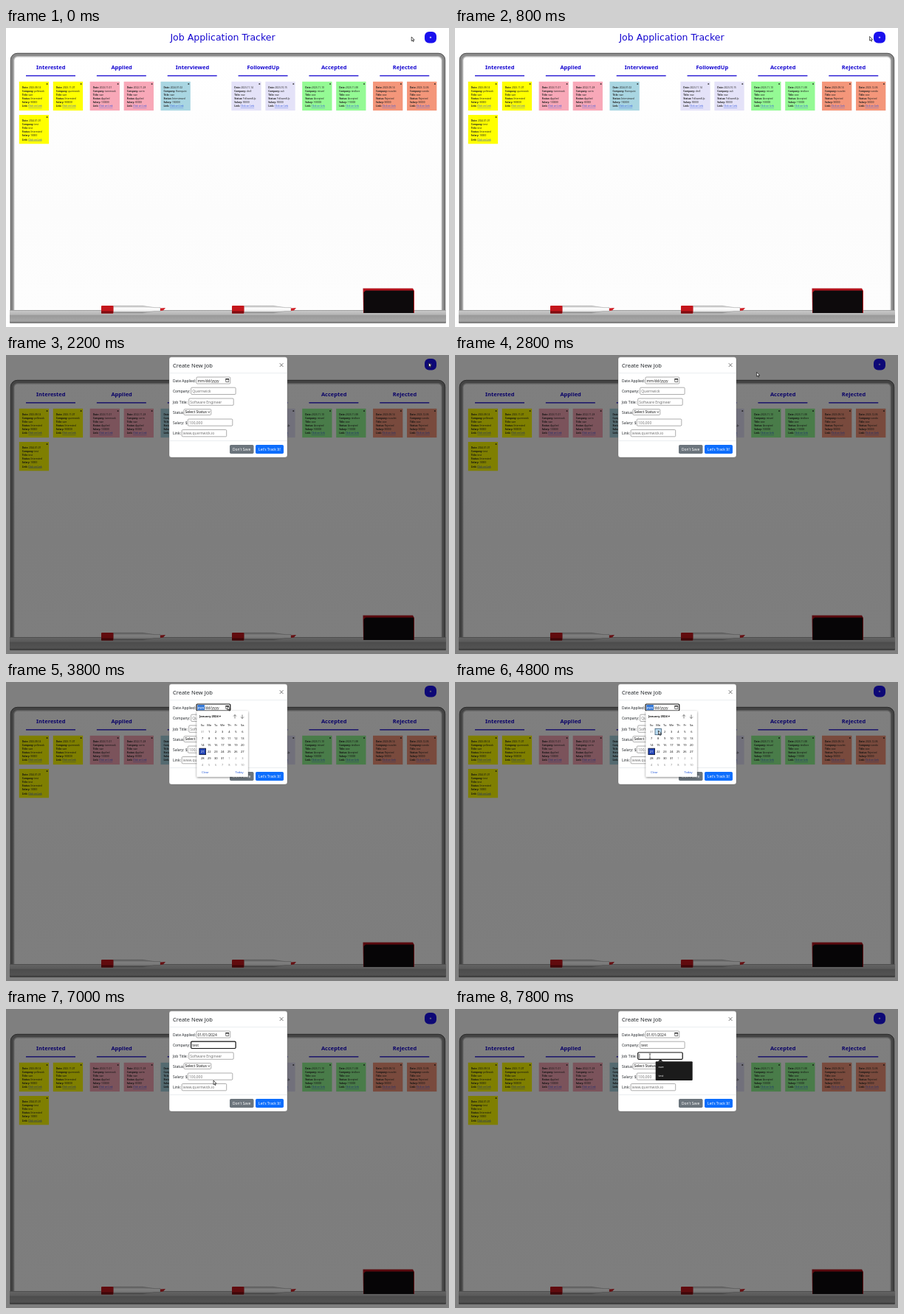
Recreate the animation shown at these times as an HTML page. Size 600x406 px, loop 8 s.

```html
<!DOCTYPE html>
<html lang="en">
<head>
<meta charset="utf-8">
<title>Job Application Tracker</title>
<style>
html, body { margin: 0; width: 100%; height: 100%; overflow: hidden; background: #fff; }
svg { display: block; width: 600px; height: 406px; font-family: "Noto Sans", "Open Sans", sans-serif; }
.hand { font-family: "DejaVu Sans", sans-serif; }
.mid { text-anchor: middle; }
</style>
</head>
<body>
<svg viewBox="0 0 600 406">
  <defs>
    <linearGradient id="surface" x2="0" y2="1">
      <stop stop-color="#fff"/><stop offset=".6" stop-color="#fcfcfc"/><stop offset="1" stop-color="#fdfdfd"/>
    </linearGradient>
    <linearGradient id="tray" x2="0" y2="1">
      <stop stop-color="#8c8c8c"/><stop offset=".08" stop-color="#c6c6c6"/><stop offset=".35" stop-color="#b4b4b4"/>
      <stop offset=".4" stop-color="#999"/><stop offset=".8" stop-color="#a6a6a6"/><stop offset="1" stop-color="#707070"/>
    </linearGradient>
    <linearGradient id="barrel" x2="0" y2="1">
      <stop stop-color="#bbb"/><stop offset=".35" stop-color="#fff"/><stop offset=".7" stop-color="#eee"/><stop offset="1" stop-color="#777"/>
    </linearGradient>
    <filter id="shadow" x="-20%" y="-20%" width="140%" height="140%">
      <feDropShadow dx="0" dy="1" stdDeviation="1.5" flood-opacity=".5"/>
    </filter>
  </defs>
  <g id="board"></g>
  <g id="button"></g>
  <g id="modal"></g>
  <g id="cursor"></g>
</svg>
<script>
const BLUE = "#1406d0";
const LOOP = 8000, STEP = 200;
const layer = id => document.getElementById(id);

const rect = (x, y, w, h, fill, more = "") =>
  `<rect x="${x}" y="${y}" width="${w}" height="${h}" fill="${fill}" ${more}/>`;
const path = (d, fill, more = "") => `<path d="${d}" fill="${fill}" ${more}/>`;
const line = (d, color, width) => path(d, "none", `stroke="${color}" stroke-width="${width}"`);
const text = (x, y, size, s, fill = "#212529", more = "") =>
  `<text x="${x}" y="${y}" font-size="${size}" fill="${fill}" ${more}>${s}</text>`;

// Columns: heading, note colour, then notes as date, company, title, salary
const columns = [
  ["Interested", "#ffff00", ["2023-08-14", "pellowick", "swe", 90000],
    ["2023-11-07", "quernwick", "swe", 900000], ["2024-01-01", "test", "test", 10000]],
  ["Applied", "#f8a8b8", ["2023-11-01", "tarnmook", "swe", 100000], ["2022-11-28", "ovrin", "swe", 80000]],
  ["Interviewed", "#a9d6e2", ["2024-01-02", "Harnquist", "swe", 150000]],
  ["FollowedUp", "#e4e2f8", ["2023-11-14", "drell", "swe", 90000], ["2023-10-15", "zuli", "swe", 90000]],
  ["Accepted", "#94fa94", ["2023-11-10", "mivvel", "swe", 100000], ["2023-11-08", "tindlore", "swe", 110000]],
  ["Rejected", "#f4967a", ["2023-08-14", "nuvolet", "swe", 90000], ["2023-12-06", "vondo", "swe", 90000]],
];

function note(x, y, color, status, [date, company, title, salary]) {
  const rows = { Date: date, Company: company, Title: title, Status: status, Salary: salary };
  const lines = Object.entries(rows).map(([key, value], i) =>
    text(x + 4, y + 8.8 + i * 5.1, 3.15, `<tspan font-weight="700">${key}:</tspan> ${value}`, "#222"));
  return rect(x, y, 40.3, 39.3, color) + lines.join("") +
    text(x + 4, y + 34.5, 3.15, '<tspan font-weight="700">Link:</tspan> ' +
      '<tspan fill="#2a50e0" text-decoration="underline">Click on Link</tspan>', "#222") +
    text(x + 36.8, y + 4.3, 3.8, "x", "#111", 'font-weight="700"');
}

const marker = x => `<g transform="translate(${x} 377)">` +
  path("M16 .3H56L72 2.6H80V7.6H72L56 10H16Z", "url(#barrel)", 'stroke="#888" stroke-width=".4"') +
  rect(0, 0, 16.5, 10.5, "#c4161c", 'rx="1"') + rect(0, 7.5, 16, 3, "#7d0c10") +
  path("M80 3.5 87 3 84 6.6 80 7Z", "#cf2228") + "</g>";

function drawBoard() {
  let out = rect(0, 0, 600, 406, "#fff") +
    text(293.5, 17, 12.5, "Job Application Tracker", BLUE, 'class="hand mid"') +
    rect(8.5, 36.5, 584, 356, "url(#surface)", 'rx="7" stroke="#8a8a8a" stroke-width="5"') +
    rect(6.3, 34.3, 588.4, 360, "none", 'rx="9" stroke="#555" stroke-width="1"') +
    rect(10.7, 38.7, 579.6, 350, "none", 'rx="5" stroke="#bcbcbc" stroke-width="1.4"') +
    rect(5, 383, 591, 18, "url(#tray)", 'rx="1"');
  columns.forEach(([status, color, ...notes], i) => {
    const x = 17.8 + i * 95.85;
    out += text(x + 43, 55.8, 7.5, status, BLUE, 'class="mid" font-weight="700"') +
      rect(x + 9.2, 64.2, 67, 1.3, BLUE);
    notes.forEach((n, k) => out += note(x + (k % 2) * 46, 72.8 + (k >> 1) * 45.2, color, status, n));
  });
  out += marker(129) + marker(306) +
    path("M483.5 353.5H551L553 357V387H484Z", "#b3121c") +
    path("M487 356.5H552V387H484.5V359Z", "#0d0a0c");
  layer("board").innerHTML = out;
}

const field = (x, y, w, h, on) =>
  rect(x, y, w, h, "#fff", `rx="1.2" stroke="${on ? "#111" : "#767676"}" stroke-width="${on ? 1.2 : .6}"`);

function calendar(t) {
  let out = rect(258.5, 39.3, 69.3, 89.5, "#fff", 'rx="1" filter="url(#shadow)"') +
    text(262, 48, 4, "January 2024 ▾", "#111", 'font-weight="700"') +
    line("M310 49.5V44.5M308 46.5 310 44.5 312 46.5M320 44.5V49.5M318 47.5 320 49.5 322 47.5", "#333", .6);
  const cell = (col, row, s, fill) =>
    text(266.2 + col * 9.02, 59.8 + row * 9.1, 4, s, fill, 'class="mid"');
  ["Su", "Mo", "Tu", "We", "Th", "Fr", "Sa"].forEach((d, i) => out += cell(i, 0, d, "#111"));
  out += rect(261.9, 90.2, 8.6, 8.4, "#2446b8", 'stroke="#101838" stroke-width=".9"');
  if (t >= 4600) out += rect(271, 63.3, 8.5, 8.4, "#b9dcf2", 'stroke="#2b4a66" stroke-width=".7"');
  for (let i = 0; i < 42; i++) {
    const day = (i + 30) % 31 + 1;
    const fill = i === 21 ? "#fff" : i < 1 || i > 31 ? "#888" : "#111";
    out += cell(i % 7, 1 + Math.floor(i / 7), day, fill);
  }
  return out + text(265, 123.8, 4, "Clear", "#2458d8") + text(310.5, 123.8, 4, "Today", "#2458d8");
}

function suggest(x, y, items, active) {
  let out = rect(x, y, 50, items.length * 11.6 + 2.6, "#1b1b1b", 'rx="1"') +
    path(`M${x + 3} ${y}l3.5 -3 3.5 3Z`, "#1b1b1b");
  items.forEach((s, i) => {
    if (i === active) out += rect(x, y + 1.3 + i * 11.6, 50, 11.6, "#454545");
    out += text(x + 3.8, y + 9 + i * 11.6, 4, s, "#eee");
  });
  return out;
}

function modal(t) {
  if (t < 2200) return "";
  const picking = t >= 3400 && t < 5600;
  const inCompany = t >= 6000 && t < 7400, inTitle = t >= 7400;
  const hint = "#757575", ink = "#222";
  let out = rect(0, 0, 600, 406, "#000", 'opacity=".5"') +
    rect(221, 2.8, 160, 136.2, "#fff", 'rx="3" stroke="#555" stroke-width=".3"') +
    text(226, 16.8, 7.5, "Create New Job", "#212529", 'font-weight="500"') +
    line("M370.7 11.2 375.5 16M375.5 11.2 370.7 16", "#666", .9) +
    line("M221 24.5H381M221 116.5H381", "#dee2e6", .6);

  const labels = [["Date Applied:", 36.6], ["Company:", 51.2], ["Job Title:", 65.8],
    ["Status:", 79.6], ["Salary: $", 93.5], ["Link:", 108.2]];
  for (const [s, y] of labels) out += text(226, y, 4.95, s);

  out += field(258, 30, 45.8, 9, picking) + field(250.6, 44.2, 60.5, 9.3, inCompany) +
    field(247.7, 59, 60.5, 9.3, inTitle) + field(241, 73.6, 36.8, 7.8) +
    field(246.3, 87, 60.5, 9.2) + field(238.2, 101.5, 60.5, 9.3);

  if (picking) out += rect(259.3, 31, 9.6, 7.2, "#3478d8");
  out += t < 5600
    ? text(259.5, 36.6, 4.95, `<tspan fill="${picking ? "#fff" : ink}">mm</tspan>/dd/yyyy`, ink)
    : text(259.5, 36.6, 4.95, "01/01/2024", ink);
  out += rect(297.8, 32.5, 4, 4, "none", 'stroke="#222" stroke-width=".6"') + rect(297.6, 32, 4.4, 1.4, "#222");

  out += t < 7000 ? text(252.2, 51.2, 5, "Quernwick", hint) : text(252.2, 51.2, 5, "test", ink);
  out += inTitle ? line("M249.8 61V66.8", "#111", .6) : text(249.2, 65.8, 5, "Software Engineer", hint);
  out += text(242.5, 79.4, 4.95, "Select Status", "#111") + line("M273.4 76.6 274.8 78.2 276.2 76.6", "#111", .7) +
    text(248, 93.5, 4.95, "100,000", hint) + text(239.8, 108, 4.95, "www.quernwick.io", hint) +
    rect(303, 122, 32.5, 12, "#6c757d", 'rx="1.8"') + text(319.2, 129.8, 4.9, "Don't Save", "#fff", 'class="mid"') +
    rect(338, 122, 38, 12, "#0d6efd", 'rx="1.8"') + text(357, 129.8, 4.9, "Let's Track It!", "#fff", 'class="mid"');

  if (t >= 3600 && t < 5600) out += calendar(t);
  if (t >= 6000 && t < 7000)
    out += suggest(274, 56.5, ["vondo", "8am - DevOpsUnit", "Harnquist", "test"], t >= 6600 ? 3 : -1);
  if (t >= 7600) out += suggest(271.7, 71.3, ["swe", "test"]);
  return out;
}

// Pointer stops: time, x, y
const stops = [[0, 549.2, 12], [200, 549.2, 12], [1400, 574, 11], [2000, 574, 11], [2200, 572.5, 10.5],
  [3200, 299.5, 32], [3800, 300, 32.5], [4600, 275.5, 66], [5600, 275.5, 66], [6000, 274.8, 49.5],
  [6200, 279, 78], [6600, 281, 97], [7000, 281, 97], [7400, 264, 64], [8000, 264, 64]];

function pointer(t) {
  const i = stops.findIndex(s => s[0] > t) - 1;
  const [a, b] = [stops[i], stops[i + 1]];
  const k = (t - a[0]) / (b[0] - a[0]);
  return [1, 2].map(n => a[n] + (b[n] - a[n]) * k);
}

function cursor(t) {
  const [x, y] = pointer(t);
  const edge = 'stroke="#111" stroke-width=".7"';
  let shape;
  if (t === 6000 || t >= 7400)
    shape = line("M-1.3 -3H1.3M0 -3V3M-1.3 3H1.3", "#111", .6);
  else if (t >= 1400 && t < 2200)
    shape = path("M0 0Q1 -.6 1.6 0V3L4.4 3.8V6L3.6 8H.4L-1.8 5 -1 4.3 0 5Z", "#fff", edge);
  else
    shape = path("M0 0V5.7L1.3 4.5 2.2 6.6 3.1 6.2 2.2 4.2H4Z", "#fff", edge);
  return `<g transform="translate(${x} ${y})">${shape}</g>`;
}

function button(t) {
  const grow = t >= 1400 && t < 2200 ? 1 : 0;
  return rect(567 - grow, 5 - grow * .8, 16 + grow * 2, 15.4 + grow * 1.6, "#1a10ee", `rx="${6 + grow * .5}"`) +
    line("M573.8 12.8H576.2M575 11.6V14", "#fff", .7);
}

let shown = -1;
function frame(now) {
  const t = Math.floor(now % LOOP / STEP) * STEP;
  if (t !== shown) {
    shown = t;
    layer("button").innerHTML = button(t);
    layer("modal").innerHTML = modal(t);
    layer("cursor").innerHTML = cursor(t);
  }
  requestAnimationFrame(frame);
}

drawBoard();
frame(performance.now());
</script>
</body>
</html>
```
